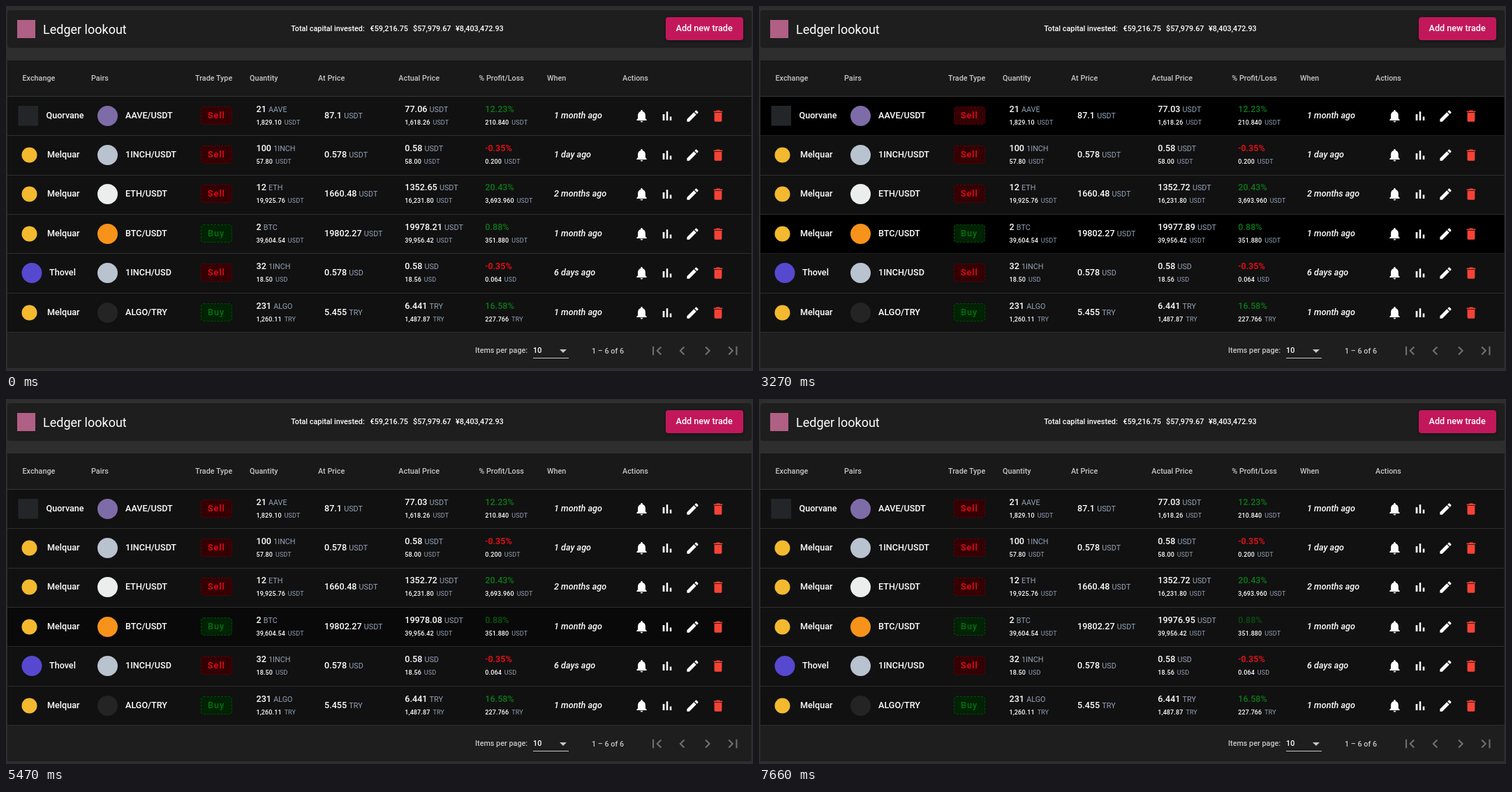
Recreate the animation shown at these times as an HTML page. Size 1070x523 px, loop 8000 ms.

```html
<!DOCTYPE html>
<html lang="en">
<head>
<meta charset="utf-8">
<title>Ledger lookout</title>
<style>
  html, body { margin: 0; width: 100%; height: 100%; overflow: hidden; background: #2e2e2e; }
  svg { display: block; font: 500 12.6px Roboto, sans-serif; fill: #fff; white-space: pre; }
  .title { font-size: 18px; font-weight: 400; }
  .label { font-size: 10.8px; }
  .small { font-size: 9px; letter-spacing: .12px; }
  .unit { font-size: 10.8px; font-weight: 400; fill: #94a3b8; }
  .small .unit { font-size: 9px; }
  .when { font-style: italic; }
  .badge { letter-spacing: 1px; }
  .grey { fill: #c6c6c6; }
  .page { fill: #707070; }
  .raised { filter: drop-shadow(0 1px 2px rgba(0, 0, 0, .4)); }
</style>
</head>
<body>
<svg id="stage" width="1070" height="523" viewBox="0 0 1070 523"></svg>
<script>
const LOOP = 8000;
const GREEN = '#0b7a17', RED = '#f80d17', ROW_GREY = 17;

const EXCHANGES = {
  Quorvane: { x: 57.5, mark: c => rect(17.5, c - 14, 28.5, 28.5, '#232628') },
  Melquar: { x: 59, mark: c => circle(33.5, c + .5, 11, '#f3ba2f') },
  Thovel: { x: 62, mark: c => circle(37, c + .5, 14.5, '#5748d0') }
};
const COIN_COLORS = { AAVE: '#7d6ca8', '1INCH': '#b9c2cf', ETH: '#eaeeec', BTC: '#f7931a', ALGO: '#242424' };

// exchange, base, quote, side, quantity, total, price, actual, actual total, percent, gain, when
const TRADES = [
  ['Quorvane', 'AAVE', 'USDT', 'Sell', '21', '1,829.10', '87.1', '77.06', '1,618.26', '12.23%', '210.840', '1 month ago'],
  ['Melquar', '1INCH', 'USDT', 'Sell', '100', '57.80', '0.578', '0.58', '58.00', '-0.35%', '0.200', '1 day ago'],
  ['Melquar', 'ETH', 'USDT', 'Sell', '12', '19,925.76', '1660.48', '1352.65', '16,231.80', '20.43%', '3,693.960', '2 months ago'],
  ['Melquar', 'BTC', 'USDT', 'Buy', '2', '39,604.54', '19802.27', '19978.21', '39,956.42', '0.88%', '351.880', '1 month ago'],
  ['Thovel', '1INCH', 'USD', 'Sell', '32', '18.50', '0.578', '0.58', '18.56', '-0.35%', '0.064', '6 days ago'],
  ['Melquar', 'ALGO', 'TRY', 'Buy', '231', '1,260.11', '5.455', '6.441', '1,487.87', '16.58%', '227.766', '1 month ago']
];

// Each update sets new prices by row and flashes those rows.
const UPDATES = [
  { at: 1190, fade: 280, prices: { 2: '1352.72', 3: '19978.27' } },
  { at: 3270, fade: 260, prices: { 0: '77.03', 3: '19977.89' } },
  { at: 5330, fade: 280, prices: { 3: '19978.08' }, tint: '#07590f' },
  { at: 7390, fade: 270, prices: { 3: '19976.95' }, tint: '#07500e' }
];

const ICONS = {
  bell: 'M12 22c1.1 0 2-.9 2-2h-4c0 1.1.89 2 2 2zm6-6v-5c0-3.07-1.64-5.64-4.5-6.32V4c0-.83-.67-1.5-1.5-1.5s-1.5.67-1.5 1.5v.68C7.63 5.36 6 7.92 6 11v5l-2 2v1h16v-1z',
  bars: 'M5 9.2h3V19H5zM10.6 5h2.8v14h-2.8zM16.2 13H19v6h-2.8z',
  pencil: 'M3 17.25V21h3.75L17.81 9.94l-3.75-3.75zM20.71 7.04c.39-.39.39-1.02 0-1.41l-2.34-2.34c-.39-.39-1.02-.39-1.41 0l-1.83 1.83 3.75 3.75z',
  bin: 'M6 19c0 1.1.9 2 2 2h8c1.1 0 2-.9 2-2V7H6zM19 4h-3.5l-1-1h-5l-1 1H5v2h14z',
  first: 'M18.41 16.59L13.82 12l4.59-4.59L17 6l-6 6 6 6zM6 6h2v12H6z',
  prev: 'M15.41 7.41L14 6l-6 6 6 6 1.41-1.41L10.83 12z',
  next: 'M10 6L8.59 7.41 13.17 12l-4.58 4.59L10 18l6-6z',
  last: 'M5.59 7.41L10.18 12l-4.59 4.59L7 18l6-6-6-6zM16 6h2v12h-2z'
};

const rect = (x, y, w, h, fill, extra = '') =>
  `<rect x="${x}" y="${y}" width="${w}" height="${h}" fill="${fill}" ${extra}/>`;
const circle = (x, y, r, fill) => `<circle cx="${x}" cy="${y}" r="${r}" fill="${fill}"/>`;
const text = (x, y, content, cls = '', extra = '') =>
  `<text x="${x}" y="${y}" class="${cls}" ${extra}>${content}</text>`;
const amount = (value, unit, id = '', dx = 0) =>
  `<tspan ${id && `id="${id}"`}>${value}</tspan> <tspan class="unit" dx="${dx}">${unit}</tspan>`;
const smallAmount = (x, y, value, unit) => text(x, y, amount(value, unit, '', 1.6), 'small');
const icon = (name, x, y, scale, attrs = '') =>
  `<path d="${ICONS[name]}" transform="translate(${x} ${y}) scale(${scale})" ${attrs}/>`;
const lineY = i => Math.floor(129.3 + 56.4 * i);
const divider = i => rect(2, lineY(i), 1065.5, 1, '#fff', 'opacity=".12"');

function badge(side, c) {
  const [fill, edge, ink] = side === 'Sell' ? ['#340003', '#600006', '#f00c16'] : ['#002303', '#054a0b', '#087213'];
  return rect(279.5, c - 12.5, 44, 25, fill, `rx="3.5" stroke="${edge}" stroke-dasharray="3 2"`) +
    text(289, c + 4, side, 'badge', `style="fill:${ink}"`);
}

function tradeRow(trade, i) {
  const [exchange, base, quote, side, qty, total, price, actual, actualTotal, percent, gain, when] = trade;
  const c = Math.floor(157 + 56.4 * i), top = c - 5, mid = c + 4, low = c + 13;
  const { x, mark } = EXCHANGES[exchange];
  const y = lineY(i) + 1;
  return rect(2, y, 1065.5, lineY(i + 1) + 1 - y, '#111', `id="row${i}"`) +
    divider(i + 1) +
    mark(c) + text(x, mid, exchange) +
    circle(145.5, c + .5, 14.5, COIN_COLORS[base]) + text(171, mid, `${base}/${quote}`) +
    badge(side, c) +
    text(358.5, top, amount(qty, base)) + smallAmount(358.5, low, total, quote) +
    text(456, mid, amount(price, quote)) +
    text(571.3, top, amount(actual, quote, `price${i}`)) + smallAmount(571.3, low, actualTotal, quote) +
    text(686.3, top, percent, '', `id="percent${i}" style="fill:${percent[0] === '-' ? RED : GREEN}"`) +
    smallAmount(686.3, low, gain, quote) +
    text(785, mid, when, 'when') +
    ['bell', 'bars', 'pencil', 'bin'].map((name, k) =>
      icon(name, 899.7 + 36.5 * k, c - 10.2, .9, name === 'bin' ? 'fill="#f44336"' : '')).join('');
}

const HEADINGS = { Exchange: 23.5, Pairs: 122, 'Trade Type': 271, Quantity: 349, 'At Price': 447,
  'Actual Price': 562.3, '% Profit/Loss': 677.3, When: 775, Actions: 883 };

document.getElementById('stage').innerHTML =
  rect(0, 0, 1070, 523, '#2e2e2e') +
  rect(2, 6, 1066, 54, '#1e1e1e', 'rx="4"') +
  rect(16, 20, 26, 26, '#b06084') +
  text(53, 40, 'Ledger lookout', 'title') +
  text(408.3, 36, 'Total capital invested:', 'label') +
  text(521.5, 36, '€59,216.75', 'label') +
  text(583, 36, '$57,979.67', 'label') +
  text(644, 36, '¥8,403,472.93', 'label') +
  rect(945, 16, 111, 33, '#c2185b', 'rx="4" class="raised"') +
  text(959.5, 36, 'Add new trade') +
  rect(2, 78, 1065.5, 441, '#1e1e1e') +
  rect(2, 78, 1065.5, 52, '#191919') +
  Object.entries(HEADINGS).map(([name, x]) => text(x, 107, name, 'label grey')).join('') +
  divider(0) +
  TRADES.map(tradeRow).join('') +
  text(672, 497, 'Items per page:', 'label grey') +
  text(755, 497, '10', 'label') +
  rect(755, 504, 51, 1, '#c6c6c6') +
  '<path d="M793 492h10l-5 5z" fill="#c6c6c6"/>' +
  text(839, 498, '1 – 6 of 6', 'label grey') +
  ['first', 'prev', 'next', 'last'].map((name, k) =>
    icon(name, 919.7 + 36.3 * k, 481.4, 1.05, 'class="page"')).join('');

const byId = id => document.getElementById(id);
const setText = (el, value) => { if (el.textContent !== value) el.textContent = value; };

function draw(now) {
  const t = now % LOOP;
  TRADES.forEach((trade, i) => {
    if (!UPDATES.some(u => u.prices[i])) return;
    const latest = UPDATES.filter(u => u.prices[i] && t >= u.at).pop();
    const step = latest ? Math.min(4, Math.floor((t - latest.at) / latest.fade * 4)) : 4;
    const grey = Math.round(ROW_GREY * step / 4);
    byId('row' + i).setAttribute('fill', `rgb(${grey},${grey},${grey})`);
    byId('percent' + i).style.fill = latest?.tint || GREEN;
    setText(byId('price' + i), latest ? latest.prices[i] : trade[7]);
  });
}

const start = performance.now();
function tick() {
  draw(performance.now() - start);
  requestAnimationFrame(tick);
}
tick();
</script>
</body>
</html>
```
